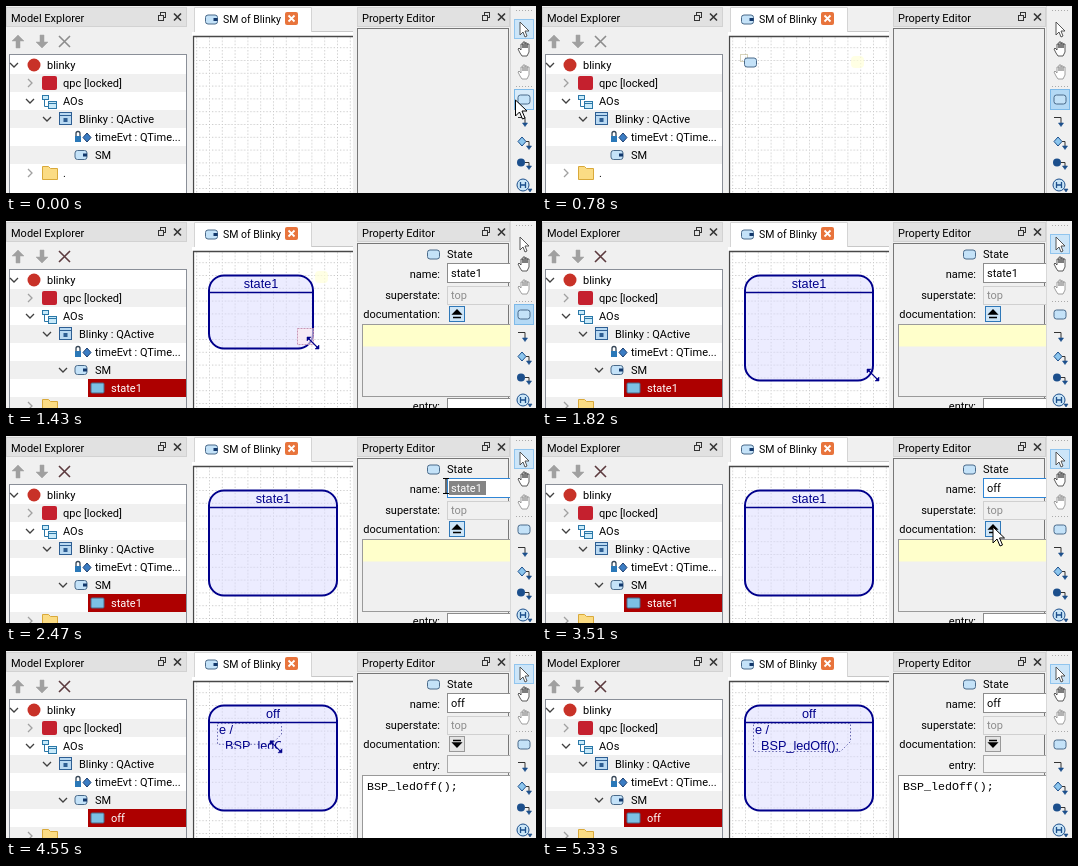
Recreate the animation shown at these times as an HTML page. Size 530x187 px, loop 5460 ms.

```html
<!DOCTYPE html>
<html lang="en">
<head>
<meta charset="utf-8">
<title>State machine editor</title>
<style>
  html, body { margin: 0; width: 100%; height: 100%; overflow: hidden; background: #f0f0f0; }
  svg { display: block; }
  text { font: 11px Roboto, "Noto Sans", sans-serif; white-space: pre; }
  .uml { font: 12.7px "Liberation Sans", Arial, sans-serif; }
  .code { font: 11.65px "Liberation Mono", monospace; }
  .tab { font-size: 10.5px; }
</style>
</head>
<body>
<svg id="stage" width="530" height="187" viewBox="0 0 530 187"></svg>
<script>
const LOOP = 5460, STEP = 130, NAVY = '#00008b';
const stage = document.getElementById('stage');

const rect = (x, y, w, h, fill, stroke = 'none', r = 0, extra = '') =>
  `<rect x="${x}" y="${y}" width="${w}" height="${h}" rx="${r}" fill="${fill}" stroke="${stroke}" ${extra}/>`;
const path = (d, stroke, width = 1, fill = 'none', extra = '') =>
  `<path d="${d}" stroke="${stroke}" stroke-width="${width}" fill="${fill}" ${extra}/>`;
const text = (x, y, s, fill = '#000', cls = '', anchor = 'start') =>
  `<text x="${x}" y="${y}" fill="${fill}" class="${cls}" text-anchor="${anchor}">${s}</text>`;
const at = (x, y, body) => `<g transform="translate(${x} ${y})">${body}</g>`;
const mix = (t, t0, t1, a, b) => a + (b - a) * Math.min(1, Math.max(0, (t - t0) / (t1 - t0)));

const stateIcon = (x, y, w = 12, h = 9, fill = '#c4e2f8', r = 2.5) =>
  rect(x - w / 2, y - h / 2, w, h, fill, '#4a6a8a', r);
const smIcon = (x, y) => stateIcon(x, y) + rect(x + 2, y - 1.5, 4, 3, '#12386c');
const chevron = (x, y, open) =>
  path(open ? `M${x - 4} ${y - 2}l4 4 4-4` : `M${x - 2} ${y - 4}l4 4-4 4`, open ? '#404040' : '#a0a0a0', 1.3);

const dockTitle = (x, w, label, iconX) =>
  rect(x - 4.5, 1.5, w, 19, '#e1e1e1', '#d2d2d2') + text(x, 15.5, label) +
  rect(iconX - 1.5, 6.5, 5, 5, 'none', '#333') + rect(iconX - 3.5, 9.5, 5, 5, '#e1e1e1', '#333') +
  path(`M${iconX + 12} 7.5l7 7m0-7l-7 7`, '#333', 1.6);

function folder(y) {
  return chevron(24, y, false) +
    path(`M36.5 ${y + 6.5}v-13h6l2 2h7v11z`, '#d9a93a', 1, '#fbdc84') + text(57, y + 4, '.');
}

function tree(name) {
  const arrow = '#a0a0a0';
  let s = dockTitle(5, 180, 'Model Explorer', 156) +
    path('M12 29l6 6h-4v7h-4v-7h-4z', arrow, .5, arrow) +
    path('M36 42l6-6h-4v-7h-4v7h-4z', arrow, .5, arrow) +
    path('M53 30l11 11m0-11l-11 11', name ? '#5c3a3e' : '#8c8c8c', 1.6) +
    rect(3.5, 48.5, 177, 145, '#fff', '#8a8f98');
  for (const y of [68, 104, 140]) s += rect(4, y, 176, 18, '#f0f0f0');
  s += chevron(8, 59, true) + `<circle cx="28" cy="59" r="6.5" fill="#c83228"/>` + text(41, 62.5, 'blinky') +
    chevron(24, 77, false) + rect(36, 70, 15, 14, '#c5202e', 'none', 2) + text(57, 81, 'qpc [locked]') +
    chevron(24, 95, true) +
    rect(36.5, 89.5, 6, 4, '#c8eafa', '#2b78a8') + rect(42.5, 95.5, 8, 7, '#c8eafa', '#2b78a8') +
    path('M38.5 94v6.500h4M42.500 97.500h8', '#2b78a8') +
    text(57, 99, 'AOs') +
    chevron(41, 113, true) + rect(53.5, 106.5, 12, 12, '#b9d9f2', '#2d5e93') +
    path('M54 109.500h11', '#2d5e93') + rect(57.5, 112, 4, 4, '#2d5e93') +
    text(73, 117, 'Blinky : QActive') +
    path('M70 130v-2.500a2 2 0 0 1 4 0v2.500', '#345', 1.3) + rect(69, 130, 6, 6, '#2a78b8') +
    path('M81 127l4 4.500-4 4.500-4-4.500z', '#1d3f70', 1, '#3b7dc4') + text(89, 135, 'timeEvt : QTime...') +
    smIcon(75, 149) + text(89, 153, 'SM');
  if (name) {
    s += chevron(57, 149, true) + rect(82, 158, 98, 18, '#ad0000') +
      stateIcon(91.5, 167, 13, 10, '#7cc0e4', 1) + text(105, 171, name, '#fff') +
      rect(4, 176, 176, 11, '#f0f0f0') + folder(185);
  } else s += folder(167);
  return s;
}

function diagram(t, size, name) {
  let s = path('M301 25.500h46', '#c8c8c8') + rect(186, 26, 161, 161, '#fff') +
    path('M188.500 26V1.500H305.500V26', '#d4d4d4', 1, '#fff') +
    smIcon(205.5, 13.5) + text(217, 17, 'SM of Blinky', '#000', 'tab') +
    rect(279, 6, 13, 13, '#e8743c', 'none', 2) + path('M282.500 9.500l6 6m0-6l-6 6', '#fff', 1.8) +
    rect(188, 31, 159, 156, 'url(#grid)') + path('M187.500 187V30.500H347', '#484848', 1.3);
  if (t >= 780 && t < 1820) s += rect(309, 50, 13, 12, '#ffffd8', 'none', 4, 'opacity=".7"');
  if (!size) return s;
  const [w, h] = size;
  s += rect(203, 54.5, w, h, 'rgba(218,218,255,.5)', NAVY, 15, 'stroke-width="2"') +
    path(`M203 71.500h${w}`, NAVY, 1.5) + text(203 + w / 2, 67, name, NAVY, 'uml', 'middle');
  if (t >= 4290) {
    const [nw, nh] = noteSize(t);
    s += path(`M211.500 72.500h${nw}v${nh - 10}l-10 10h${10 - nw}z`, '#6868b0', 1, 'none', 'stroke-dasharray="1.500 2"') +
      `<svg x="211" y="72" width="${nw}" height="${nh + 5}">` +
      text(2, 11, 'e /', NAVY, 'uml') + text(8, 27, 'BSP_ledOff();', NAVY, 'uml') + '</svg>';
  }
  return s;
}

function field(y, value, focus) {
  return rect(441.5, y + .5, 70, 19, '#fff', focus ? '#2f86d6' : '#8c8c8c') + text(445, y + 14, value);
}

function properties(t) {
  let s = dockTitle(356, 152, 'Property Editor', 480) + rect(351.5, 22.5, 151, 170, '#f0f0f0', '#777');
  if (t < 910) return s;
  const right = (y, label) => text(434, y, label, '#000', '', 'end');
  const folded = t >= 3640, hover = t >= 3510 && t < 3770;
  const value = t < 2600 ? 'state1' : t < 2860 ? 'o' : 'off';
  s += stateIcon(427.5, 33.5) + text(441, 37, 'State') +
    right(57, 'name:') + field(42, value, t >= 2470 && t < 3770) +
    right(78, 'superstate:') + rect(441.5, 65.5, 70, 18, '#f0f0f0', '#d0d0d0') + text(445, 78, 'top', '#8c8c8c') +
    right(97, 'documentation:') +
    rect(443.5, 85.5, 15, 15, folded ? '#e4e4e4' : '#cfe6f8', folded && !hover ? '#999' : '#2f78b8') +
    path(folded ? 'M447 92h8l-4 4zM447 89.500h8' : 'M447 93h8l-4-4zM447 96.500h8', '#000', 1.3, '#000');
  if (t >= 2470 && t < 2600) s += rect(443, 45, 37, 14, '#858585') + text(445, 56, 'state1', '#fff');
  if (folded) {
    const typed = 'BSP_ledOff();'.slice(0, t < 4030 ? 0 : t < 4160 ? 4 : t < 4290 ? 10 : 13);
    s += right(118, 'entry:') + rect(441.5, 104.5, 70, 17, '#f4f4f4', '#aaa') +
      rect(356.5, 124.5, 160, 75, '#fff', t >= 3900 && t < 4290 ? '#2f86d6' : '#999') +
      text(361, 139, typed, '#000', 'code');
    if (t >= 3900 && t < 4290) s += rect(362 + typed.length * 7, 129, 1, 14, '#000');
  } else {
    s += rect(356.5, 103.5, 160, 72, '#f0f0f0', '#9a9a9a') + rect(357, 104, 147, 21.5, '#ffffcb') +
      right(189, 'entry:') + rect(441.5, 177.5, 70, 19, '#fff', '#8c8c8c');
  }
  return s;
}

function toolbar(t) {
  const placing = t >= 260 && t < 1820;
  const blue = '#1c4f8c';
  const hand = 'M-4 3l-2-4 1-1 2 2v-6h2v4-6h2v6-5h2v5-4h2v8l-2 4h-5z';
  let s = path('M509 4.500h16M509 80.500h16', '#aaa', 1, 'none', 'stroke-dasharray="1 2"');
  if (!placing) s += rect(507.5, 13.5, 19, 19, '#cce5f8', '#91c5ee');
  if (placing || t < 260) s += rect(507.5, 83.5, 19, 20, placing ? '#b4d9f5' : '#d8ebfa', '#7db9e8');
  s += at(513, 16, path('M0 0v13l3-3 2 5 2-1-2-5h4z', '#444', .9, '#fff')) +
    at(517, 44, path(hand, '#333', .8, '#fff')) + at(517, 67, path(hand, '#888', .8, '#fff')) +
    stateIcon(517, 93.5, 12, 9) +
    path('M511 111.500h7v6', '#333') + path('M515.500 117h5l-2.500 3.500z', blue, .6, blue) +
    path('M515 131l4 4.500-4 4.500-4-4.500z', blue, 1, '#8cc6ee') + path('M519 135.500h3v5', '#333') +
    path('M519.500 140h5l-2.500 3.500z', blue, .6, blue) +
    `<circle cx="514" cy="156.500" r="4" fill="${blue}"/>` + path('M518 156.500h4v4', '#333') +
    path('M519.500 160h5l-2.500 3.500z', blue, .6, blue) +
    `<circle cx="516" cy="179" r="6" fill="#c9e5f7" stroke="${blue}"/>` +
    path('M513.500 176v6m5-6v6m-5-3h5', blue, 1.3) + path('M521 183h4l-2 3z', blue, .6, blue);
  return rect(504, 0, 26, 187, '#f0f0f0') + path('M504.500 0v187', '#d8d8d8') + at(1, 0, s);
}

// Width and height of the state while it is being stretched
function stateSize(t) {
  if (t < 910) return null;
  if (t <= 1430) return [mix(t, 910, 1430, 65, 104), mix(t, 910, 1430, 40, 73)];
  return t < 1560 ? [104, 73] : t < 1820 ? [112, 94] : [128, 105];
}

function noteSize(t) {
  return [mix(t, 4290, 4940, 42, 97), mix(t, 4290, 4940, 16, 28)];
}

const shapes = {
  arrow: path('M0 0v16l4-4 3 7 2.500-1-3-7h5z', '#000', 1, '#fff'),
  place: rect(-8.5, -6.5, 7, 7, 'none', '#b0a878', 0, 'stroke-dasharray="1 1"') + stateIcon(1.5, 1.5, 12, 9),
  beam: path('M-3 -7.500h2.500l.5 1 .5-1h2.500M0-7v14M-3 7.500h2.500l.5-1 .5 1h2.500', '#000', 1.1),
  size: path('M-5-5l10 10', NAVY, 1.1) + path('M-6-6h4l-4 4zM6 6h-4l4-4z', NAVY, .5, NAVY)
};

// start, end, shape, from x, y, to x, y
const moves = [
  [0, 130, 'arrow', 509.5, 94, 509.5, 94],
  [260, 390, 'arrow', 508, 93, 430, 72],
  [520, 780, 'place', 340, 60, 207, 55],
  [1950, 2340, 'arrow', 350, 145, 470, 55],
  [2470, 2470, 'beam', 440, 50, 440, 50],
  [3120, 3510, 'arrow', 478, 62, 451, 91],
  [3640, 3640, 'arrow', 451, 91, 451, 91],
  [3770, 3770, 'beam', 438, 116, 438, 116],
  [3900, 3900, 'beam', 429, 132, 429, 132]
];

function cursor(t, size) {
  if (t >= 910 && t < 1950) {
    const x = 203 + size[0], y = 54 + size[1];
    const handle = t < 1820 ? rect(x - 15.5, y - 19.5, 16, 16, 'rgba(255,235,240,.6)', '#c896b4', 0, 'stroke-dasharray="2 1"') : '';
    return handle + at(x, y - 5, shapes.size);
  }
  if (t >= 4290 && t < 5330) {
    const [w, h] = noteSize(t);
    return at(206 + w, 75 + h, shapes.size);
  }
  const m = moves.find(([a, b]) => t >= a && t <= b);
  if (!m) return '';
  const [a, b, shape, x0, y0, x1, y1] = m;
  return at(mix(t, a, b + .01, x0, x1), mix(t, a, b + .01, y0, y1), shapes[shape]);
}

const grid = `<defs><pattern id="grid" x="203" y="54" width="12.8" height="12.8" patternUnits="userSpaceOnUse">
  ${path('M.5 0v12.8M0 .5h12.8', '#bcbcbc', 1, 'none', 'stroke-dasharray="1 2.2"')}</pattern></defs>`;

function scene(t) {
  const size = stateSize(t);
  const name = t < 910 ? '' : t < 3640 ? 'state1' : 'off';
  return grid + rect(0, 0, 530, 187, '#f0f0f0') + tree(name) + diagram(t, size, name) +
    properties(t) + toolbar(t) + cursor(t, size);
}

let shown = -1;
function frame() {
  const step = Math.floor(performance.now() % LOOP / STEP);
  if (step !== shown) stage.innerHTML = scene((shown = step) * STEP);
  requestAnimationFrame(frame);
}
frame();
</script>
</body>
</html>
```
